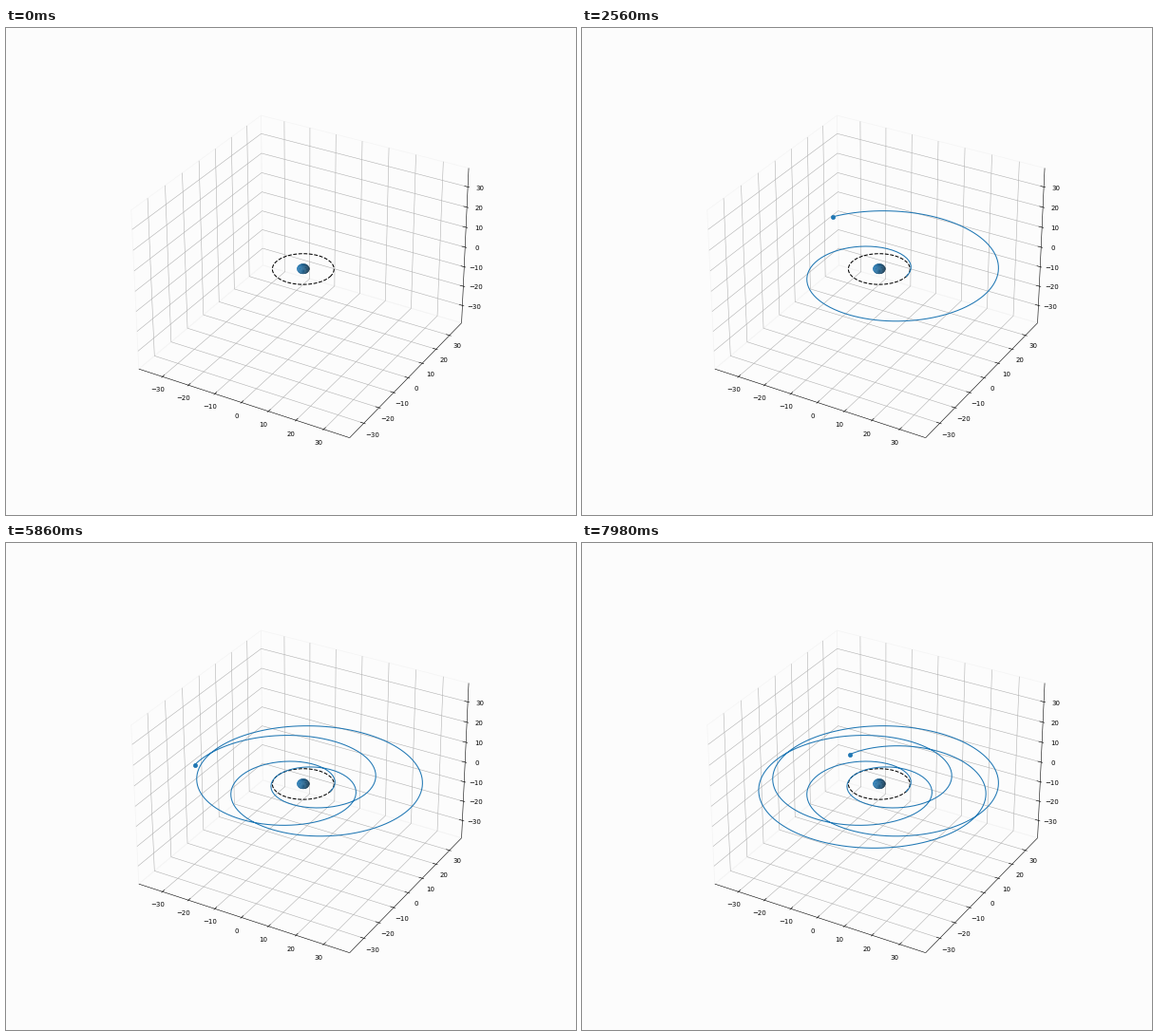
A matplotlib script for the animation above (8 s loop, 600 px wide and 513 px high).

```python
import numpy as np
import matplotlib.pyplot as plt
from matplotlib.animation import FuncAnimation
from matplotlib.collections import LineCollection, PolyCollection

WIDTH, HEIGHT, DPI = 600, 513, 50
FRAMES, INTERVAL = 400, 20
BG = "#fcfcfc"
BLUE = np.array([31, 119, 180]) / 255

# Perspective camera: elevation 30, azimuth -60, distance 10, box 4:4:3
LIMIT = 37.6
HALF = np.array([4, 4, 3]) / 7
PANE = HALF * 25 / 24
DELTA = HALF / 6
CENTER = np.array([312.84, 253.73])
SCALE = 2135.2
EL, AZ = np.radians(30), np.radians(-60)
RIGHT = np.array([-np.sin(AZ), np.cos(AZ), 0])
UP = np.array([-np.cos(AZ) * np.sin(EL), -np.sin(AZ) * np.sin(EL), np.cos(EL)])
EYE = np.array([np.cos(AZ) * np.cos(EL), np.sin(AZ) * np.cos(EL), np.sin(EL)])


def project(box):
    """Box coordinates to pixels, y pointing down."""
    box = np.asarray(box, float)
    k = SCALE / (10 - box @ EYE)
    return np.stack([CENTER[0] + k * (box @ RIGHT),
                     CENTER[1] - k * (box @ UP)], axis=-1)


def project_data(x, y, z):
    return project(np.stack([x, y, z], axis=-1) * HALF / LIMIT)


plt.rcParams["font.family"] = "DejaVu Sans"
fig = plt.figure(figsize=(WIDTH / DPI, HEIGHT / DPI), dpi=DPI, facecolor=BG)
ax = fig.add_axes([0, 0, 1, 1])
ax.set_xlim(0, WIDTH)
ax.set_ylim(HEIGHT, 0)
ax.axis("off")


def add_lines(paths, color, width, z):
    ax.add_collection(LineCollection([project(p) for p in paths],
                                     colors=color, linewidths=width, zorder=z),
                      autolim=False)


def draw_box():
    (x1, y1, z1), (x0, y0, z0) = PANE, -PANE
    panes = [
        [(x0, y0, z0), (x0, y1, z0), (x0, y1, z1), (x0, y0, z1), (x0, y0, z0)],
        [(x0, y1, z0), (x1, y1, z0), (x1, y1, z1), (x0, y1, z1), (x0, y1, z0)],
        [(x0, y0, z0), (x1, y0, z0), (x1, y1, z0), (x0, y1, z0), (x0, y0, z0)],
    ]
    add_lines(panes, "#f4f4f4", 1, 1)

    grid, ticks = [], []
    out, inn = 0.1 * DELTA, 0.2 * DELTA
    gap = 0.485 * DELTA
    for value in range(-30, 31, 10):
        a, b, c = value / LIMIT * HALF
        grid += [[(a, y0, z0), (a, y1, z0), (a, y1, z1)],
                 [(x1, b, z0), (x0, b, z0), (x0, b, z1)],
                 [(x0, y0, c), (x0, y1, c), (x1, y1, c)]]
        ticks += [[(a, y0 - out[1], z0), (a, y0 + inn[1], z0)],
                  [(x1 + out[0], b, z0), (x1 - inn[0], b, z0)],
                  [(x1 + out[0], y1, c), (x1 - inn[0], y1, c)]]
        text = str(value).replace("-", "\u2212")
        for spot in [(a, y0 - gap[1], z0 - gap[2]),
                     (x1 + gap[0], b, z0 - gap[2]),
                     (x1 + gap[0], y1 + gap[1], c)]:
            ax.text(*project(spot), text, fontsize=10, ha="center", va="top")
    add_lines(grid, "#b0b0b0", 0.8, 2)
    add_lines(ticks, "black", 0.8, 3)
    add_lines([[(x0, y0, z0), (x1, y0, z0)],
               [(x1, y0, z0), (x1, y1, z0)],
               [(x1, y1, z0), (x1, y1, z1)]], "black", 0.8, 3)


def draw_sphere(radius, nu=24, nv=14):
    light = np.array([-2, -2, 1]) / 3
    u = np.linspace(0, 2 * np.pi, nu + 1)
    v = np.linspace(0, np.pi, nv + 1)
    quads, colors = [], []
    for i in range(nu):
        for j in range(nv):
            um, vm = (u[i] + u[i + 1]) / 2, (v[j] + v[j + 1]) / 2
            n = np.array([np.cos(um) * np.sin(vm), np.sin(um) * np.sin(vm), np.cos(vm)])
            if n / HALF @ EYE < -0.1:
                continue
            uu = u[[i, i + 1, i + 1, i]]
            vv = v[[j, j, j + 1, j + 1]]
            quads.append(project_data(radius * np.cos(uu) * np.sin(vv),
                                      radius * np.sin(uu) * np.sin(vv),
                                      radius * np.cos(vv)))
            colors.append(BLUE * (0.65 + 0.35 * (n @ light)))
    ax.add_collection(PolyCollection(quads, facecolors=colors, edgecolors=colors,
                                     linewidths=0.2, zorder=4), autolim=False)


def orbit():
    """Precessing orbit between radius 10 and 40, one point per frame."""
    mean = np.radians(1.685) * np.arange(FRAMES)
    ecc = np.radians(31.1)
    e = mean.copy()
    for _ in range(30):
        e -= (e - ecc * np.sin(e) - mean) / (1 - ecc * np.cos(e))
    r = 25 - 15 * np.cos(e)
    phi = 2.488 * e + np.radians(9.5) * np.sin(e) + np.radians(2.2) * np.sin(2 * e)
    return project_data(r * np.cos(phi), r * np.sin(phi), 0 * r)


draw_box()
draw_sphere(2)
turn = np.linspace(0, 2 * np.pi, 200)
ring = project_data(10 * np.cos(turn), 10 * np.sin(turn), 0 * turn)
ax.plot(ring[:, 0], ring[:, 1], "k--", lw=1.5, zorder=5)

path = orbit()
trail, = ax.plot([], [], color=BLUE, lw=1.5, zorder=6)
dot, = ax.plot([], [], "o", color=BLUE, ms=6, zorder=7)


def update(n):
    shown = path[:n + 1] if n else path[:0]
    trail.set_data(shown[:, 0], shown[:, 1])
    dot.set_data(shown[-1:, 0], shown[-1:, 1])
    return trail, dot


anim = FuncAnimation(fig, update, frames=FRAMES, interval=INTERVAL,
                     init_func=lambda: update(0), repeat=True,
                     repeat_delay=0, blit=False)
plt.show()
```
